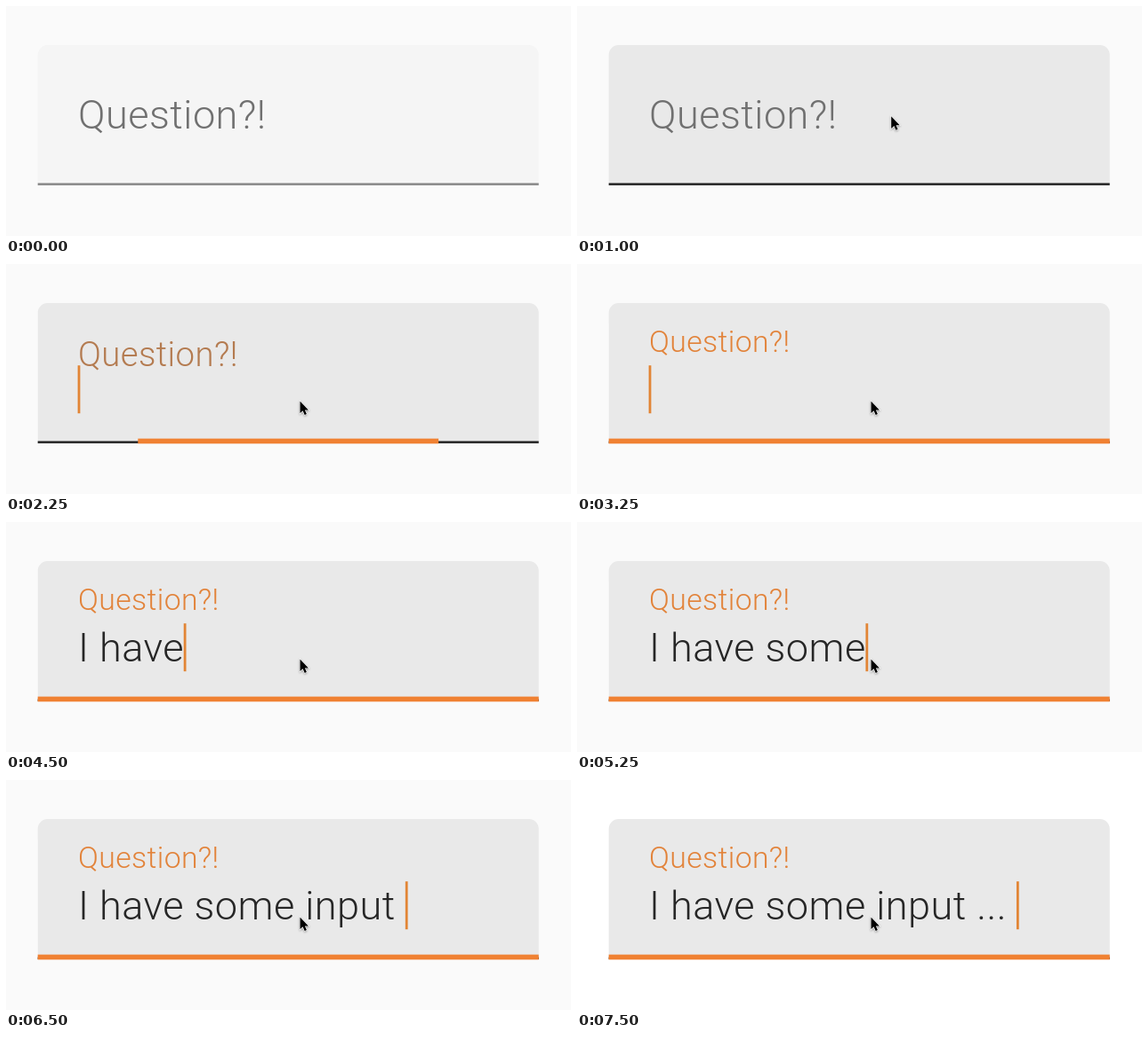
An HTML page for the animation above (8000 ms loop, 635 px wide and 259 px high).

```html
<!DOCTYPE html>
<html lang="en">
<head>
<meta charset="utf-8">
<title>Filled text field</title>
<style>
  html, body { margin: 0; width: 100%; height: 100%; overflow: hidden; }
  svg { display: block; width: 635px; height: 259px; }
  text { font: 320 45.1px Roboto, sans-serif; letter-spacing: .46px; white-space: pre; }
  #input { fill: #262626; }
  #caret { fill: #e28535; }
  #ripple { fill: #f08132; transform-origin: 317.2px 0; }
  #pointer { filter: drop-shadow(0 1px 1px #0005); }
</style>
</head>
<body>
<svg viewBox="0 0 635 259">
  <path id="field" d="M35.7 202V55a11 11 0 0 1 11-11H587.7a11 11 0 0 1 11 11V202Z"/>
  <rect id="line" x="35.7" y="199.4" width="563" height="2.5"/>
  <rect id="ripple" x="35.7" y="196.6" width="563" height="5.7"/>
  <text id="label">Question?!</text>
  <text id="input" x="81" y="157"></text>
  <rect id="caret" y="114.2" width="2.8" height="54"/>
  <path id="pointer" d="M0 0V13.6L3.1 10.7 5.2 15.5 7.4 14.5 5.4 9.9H9.5Z"
    stroke="#fff" stroke-width="1.2" paint-order="stroke"/>
</svg>
<script>
const LOOP = 8000, STEP = 250, LEFT = 81;
const $ = id => document.getElementById(id);
const mix = (a, b, p) => a + (b - a) * p;
const rgb = (a, b, p) => `rgb(${a.map((v, i) => mix(v, b[i], p))})`;
const show = (id, on) => $(id).style.visibility = on ? 'visible' : 'hidden';

// [time, characters typed]
const message = 'I have some input ... ';
const typed = [[3500, 1], [3750, 2], [4250, 4], [4500, 6], [4750, 7], [5000, 9], [5250, 11],
  [5500, 12], [5750, 13], [6000, 15], [6250, 17], [6500, 18], [7000, 19], [7250, 21], [7500, 22]];

function draw(time) {
  const t = Math.floor(time / STEP) * STEP;
  const hover = t >= 250;
  const focus = t < 2250 ? 0 : t < 2500 ? .6 : 1;

  document.body.style.background = t >= 7500 ? '#fff' : '#fafafa';
  $('field').style.fill = hover ? '#e9e9e9' : '#f5f5f5';
  $('line').style.fill = hover ? '#242424' : '#888';
  $('ripple').style.transform = `scaleX(${focus})`;
  $('label').style.transform =
    `translate(${LEFT}px, ${mix(138, 99, focus)}px) scale(${mix(1, .75, focus)})`;
  $('label').style.fill = rgb([112, 112, 112], [226, 131, 58], focus);

  const count = typed.reduce((n, [at, chars]) => t >= at ? chars : n, 0);
  $('input').textContent = message.slice(0, count);
  $('caret').setAttribute('x', LEFT - .4 + $('input').getComputedTextLength());
  show('caret', focus && (t < 2750 || t >= 3250));

  const move = 1 - (1 - Math.min(1, Math.max(0, (t - 250) / 1750))) ** 2;
  $('pointer').style.transform = `translate(${mix(400, 330.5, move)}px, ${mix(62, 154.5, move)}px)`;
  show('pointer', hover);
}

function tick() {
  draw(performance.now() % LOOP);
  requestAnimationFrame(tick);
}
tick();
</script>
</body>
</html>
```
